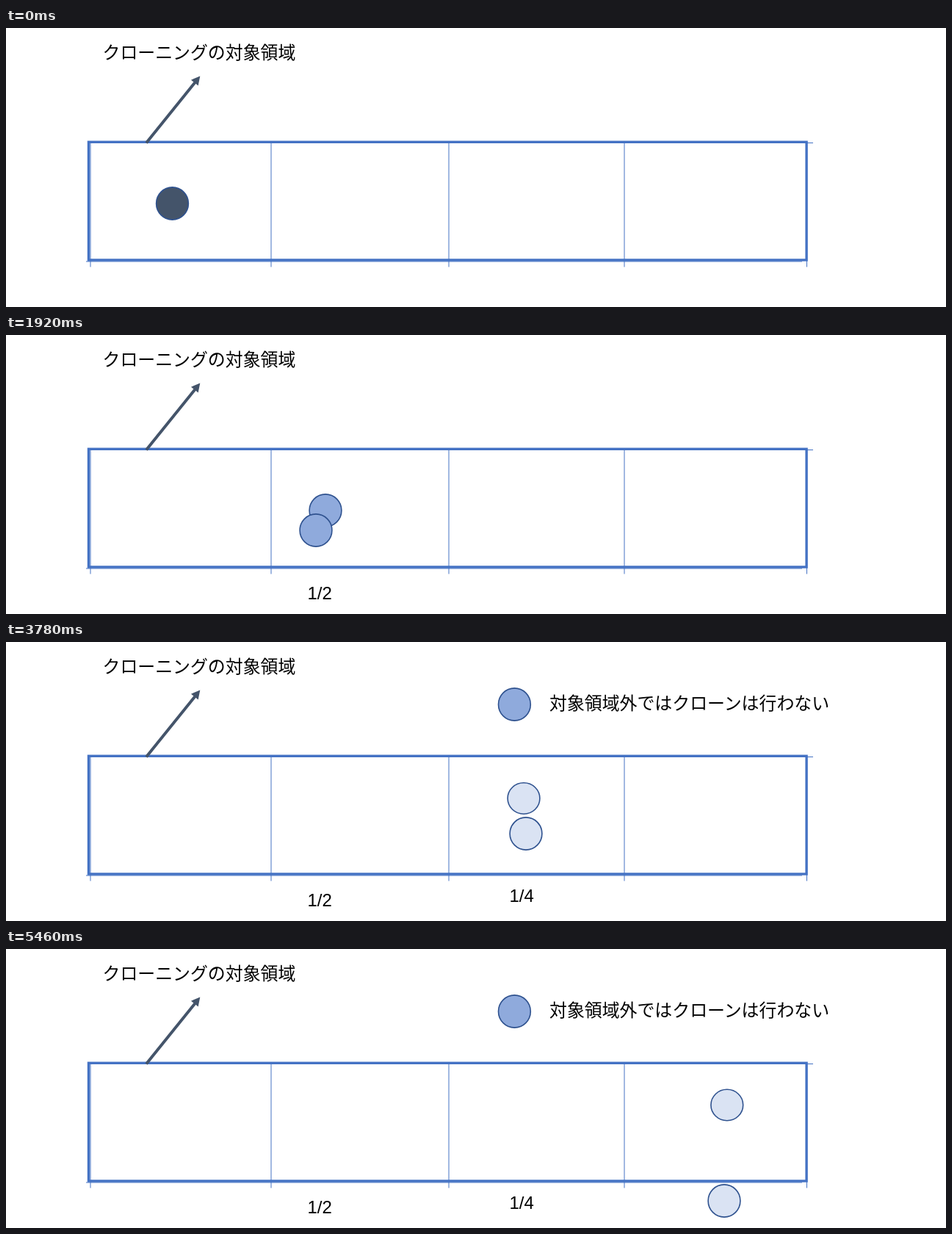
These frames come from a looping animation (1280 by 380 pixels, 5.52 s). An HTML page:

```html
<!DOCTYPE html>
<html lang="ja">
<head>
<meta charset="utf-8">
<title>クローニングの対象領域</title>
<style>
  html, body { margin: 0; width: 100%; height: 100%; overflow: hidden; background: #fff; }
  svg { display: block; width: 1280px; height: 380px; }
  .ja { font: 300 23.9px "Noto Sans CJK JP", "Noto Sans CJK", sans-serif; }
  .num { font: 24px "Liberation Sans", Arial, sans-serif; }
  .thin { stroke: #4472c4; stroke-width: 1; fill: none; }
  .frame { stroke: #4472c4; stroke-width: 3.4; fill: none; }
  ellipse { stroke: #2f528f; stroke-width: 1.6; }
</style>
</head>
<body>
<svg viewBox="0 0 1280 380">
  <g id="discs"></g>
  <path class="thin" d="M115 155V325.500M361 155V325.500M603 155V325.500M842 155V325.500M1090.500 155V325.500M112 156.500H1099M109 318H1084"/>
  <rect class="frame" x="112.500" y="155.300" width="977.600" height="160.700"/>
  <path d="M191 156.500L257.500 74" stroke="#44546a" stroke-width="4" fill="none"/>
  <path d="M264.300 65.500L261.700 78.500L252 70.700Z" fill="#44546a"/>
  <text class="ja" x="131.500" y="42">クローニングの対象領域</text>
  <text class="ja" id="note" x="740" y="92">対象領域外ではクローンは行わない</text>
  <text class="num" id="half" x="410.500" y="359.500">1/2</text>
  <text class="num" id="quarter" x="685.500" y="354">1/4</text>
</svg>
<script>
const LOOP = 5520, STEP = 60, MOVE = 1620;
const SPLIT1 = 1860, SPLIT2 = 3720;
const DARK = '#44546a', MID = '#8faadc', PALE = '#dae3f3';

// show/hide: visible interval; start: when the move begins
const discs = [
  { fill: DARK, show: 0, hide: SPLIT1, start: 166, from: [226.5, 239], to: [435, 239] },
  { fill: MID, show: SPLIT1, hide: LOOP, start: 2021, from: [435, 239], to: [692.4, 85] },
  { fill: MID, show: SPLIT1, hide: SPLIT2, start: 2021, from: [422, 266], to: [707.3, 220.2] },
  { fill: PALE, show: SPLIT2, hide: LOOP, start: 3826, from: [705, 213], to: [981.8, 212.5], ry: 21.2 },
  { fill: PALE, show: SPLIT2, hide: LOOP, start: 3826, from: [708, 261], to: [978, 343] }
];

const byId = id => document.getElementById(id);
const setVisible = (el, on) => el.setAttribute('visibility', on ? 'visible' : 'hidden');

for (const d of discs) {
  d.el = document.createElementNS('http://www.w3.org/2000/svg', 'ellipse');
  d.el.setAttribute('rx', 21.9);
  d.el.setAttribute('ry', d.ry || 22.1);
  d.el.setAttribute('fill', d.fill);
  byId('discs').appendChild(d.el);
}

// constant acceleration, then constant deceleration
function ease(u) {
  u = Math.min(1, Math.max(0, u));
  return u < 0.5 ? 2 * u * u : 1 - 2 * (1 - u) * (1 - u);
}

function draw(t) {
  for (const d of discs) {
    const p = ease((t - d.start) / MOVE);
    d.el.setAttribute('cx', d.from[0] + (d.to[0] - d.from[0]) * p);
    d.el.setAttribute('cy', d.from[1] + (d.to[1] - d.from[1]) * p);
    setVisible(d.el, t >= d.show && t < d.hide);
  }
  setVisible(byId('half'), t >= SPLIT1);
  setVisible(byId('quarter'), t >= SPLIT2);
  setVisible(byId('note'), t >= SPLIT2);
}

const origin = performance.now();
function tick() {
  const t = (performance.now() - origin) % LOOP;
  draw(Math.floor(t / STEP) * STEP);
  requestAnimationFrame(tick);
}
draw(0);
requestAnimationFrame(tick);
</script>
</body>
</html>
```
